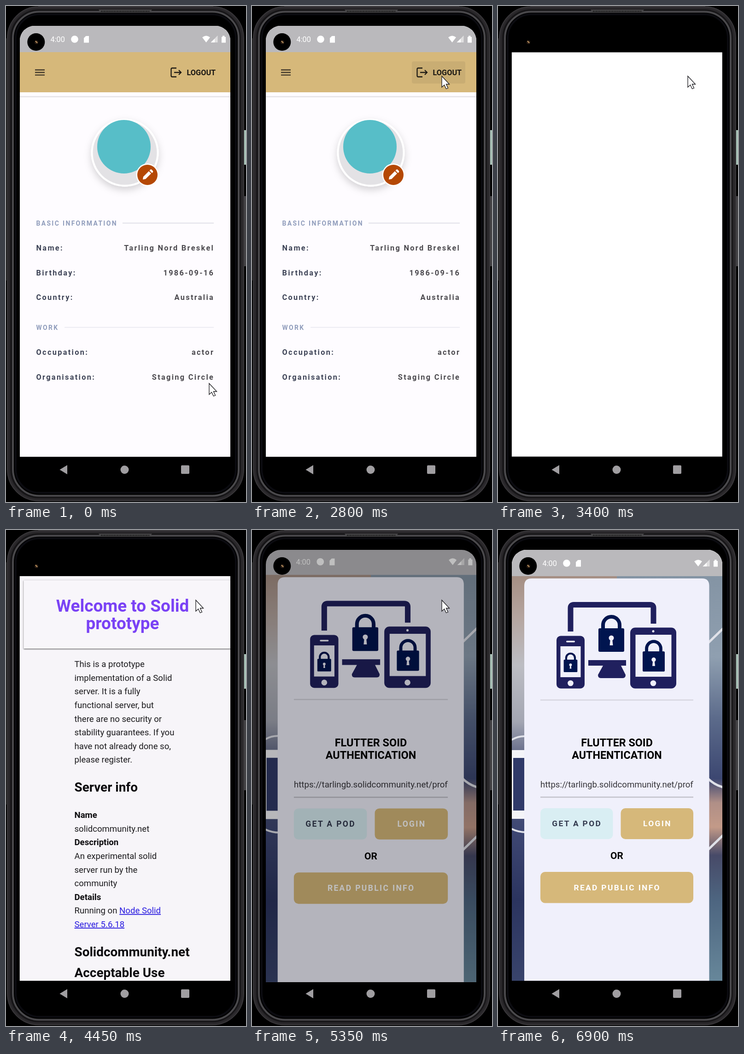
Recreate the animation shown at these times as an HTML page. Size 521x1075 px, loop 7000 ms.

```html
<!DOCTYPE html>
<html lang="en">
<head>
<meta charset="utf-8">
<title>Phone login demo</title>
<style>
html, body { margin: 0; height: 100%; overflow: hidden; background: #000; }
svg { display: block; font-family: Roboto, sans-serif; }
.row { font-weight: 700; font-size: 16.3px; letter-spacing: 2.33px; }
.head { font-weight: 700; font-size: 13.96px; letter-spacing: 2.33px; fill: #8f9cbb; }
.btn { font-weight: 700; font-size: 17.4px; letter-spacing: 2.33px; fill: #fff; }
.mid { text-anchor: middle; }
.end { text-anchor: end; }
.title { font-weight: 700; font-size: 23.3px; }
.web { font-size: 18.6px; fill: #1c1b1e; }
.web .b { font-weight: 700; fill: #0c0b0e; }
.web .h2 { font-weight: 700; font-size: 27.9px; fill: #0c0b0e; }
.web .link { fill: #2b1de0; text-decoration: underline; }
</style>
</head>
<body>
<svg width="521" height="1075" viewBox="0 0 521 1075">
  <defs>
    <clipPath id="screen"><rect x="30" y="43" width="457" height="990" rx="32"/></clipPath>
    <clipPath id="window"><rect x="30" y="43" width="457" height="934"/></clipPath>
    <clipPath id="page"><rect x="29.5" y="100" width="457.5" height="877"/></clipPath>
    <clipPath id="field"><rect x="92" y="530" width="332" height="45"/></clipPath>
    <linearGradient id="left" x2="0" y2="1">
      <stop offset="0" stop-color="#a58f84"/><stop offset=".1" stop-color="#b5a59f"/>
      <stop offset=".22" stop-color="#bcbdc3"/><stop offset=".36" stop-color="#a3a6b2"/>
      <stop offset=".45" stop-color="#5d6484"/><stop offset=".62" stop-color="#3f4874"/>
      <stop offset=".8" stop-color="#2b345f"/><stop offset="1" stop-color="#39446c"/>
    </linearGradient>
    <linearGradient id="right" x2="0" y2="1">
      <stop offset="0" stop-color="#8494a4"/><stop offset=".2" stop-color="#8f9fb0"/>
      <stop offset=".35" stop-color="#5c6b8b"/><stop offset=".5" stop-color="#3c4771"/>
      <stop offset=".56" stop-color="#b08f87"/><stop offset=".62" stop-color="#c39a88"/>
      <stop offset=".69" stop-color="#474a68"/><stop offset=".8" stop-color="#4d6580"/>
      <stop offset="1" stop-color="#67879a"/>
    </linearGradient>
    <filter id="soft" x="-30%" y="-30%" width="160%" height="170%">
      <feDropShadow dx="0" dy="7" stdDeviation="8" flood-opacity=".17"/>
    </filter>
    <filter id="edge"><feDropShadow dx="0" dy="1" stdDeviation="1.8" flood-opacity=".75"/></filter>
    <g id="lock">
      <path d="M-18 3V-7a18 18 0 0 1 36 0V3" fill="none" stroke="#00154f" stroke-width="8"/>
      <rect x="-28" width="56" height="51" rx="3" fill="#00154f"/>
      <path d="M-2 22h4l1.5 15h-7z" fill="#f0f0fb"/><circle cy="21" r="5.5" fill="#f0f0fb"/>
    </g>
  </defs>

  <!-- phone body -->
  <path d="M70 .5H450M.5 70V595" stroke="#444" fill="none"/>
  <rect x="517" y="269" width="4" height="75" fill="#a9c3b8"/>
  <rect x="517" y="412" width="4" height="152" fill="#434245"/>
  <rect x="3" y="1.5" width="513" height="1071" rx="68" fill="#2b292c" stroke="#39373a" stroke-width="2"/>
  <rect x="9" y="7" width="501" height="1060" rx="62" fill="#141315" stroke="#222023" stroke-width="2"/>
  <rect x="15" y="12.5" width="490" height="1049" rx="57" fill="#000" stroke="#4a494c" stroke-width="4"/>
  <rect x="21" y="18" width="478" height="1037" rx="51" fill="#000" stroke="#0b0b10" stroke-width="4"/>
  <path d="M201 8H317L312 14H206Z" fill="#4a494b"/>
  <path d="M206 11.5H312" stroke="#161616" stroke-width="3" stroke-dasharray="2 1.5"/>

  <g clip-path="url(#screen)">
    <g id="app">
      <g clip-path="url(#window)">
        <g id="profile">
          <rect x="30" y="43" width="457" height="934" fill="#fefcff"/>
          <rect x="30" y="100" width="457" height="87" fill="#d6b87a"/>
          <path d="M30 196.5H487" stroke="#e9e7ea" stroke-width="3"/>
          <rect id="hover" x="347" y="120" width="116" height="48" rx="4"/>
          <path d="M63 138.500H84M63 144H84M63 149.700H84" stroke="#41382a" stroke-width="2.3"/>
          <path d="M370 134.500H361Q358.500 134.500 358.500 137V151Q358.500 153.500 361 153.500H370M365 144H380M375 139L380 144L375 149"
            fill="none" stroke="#1f1b15" stroke-width="2.3"/>
          <text x="392.5" y="149.600" font-size="16.3" font-weight="700" fill="#1a1713">LOGOUT</text>
          <circle cx="258" cy="318" r="73.5" fill="#fff" filter="url(#soft)"/>
          <circle cx="258" cy="318" r="69.5" fill="#e3e2e5"/>
          <ellipse cx="256" cy="305" rx="58" ry="58" fill="#57bec8"/>
          <circle cx="307" cy="366" r="24.5" fill="#fff"/>
          <circle cx="307" cy="366" r="22" fill="#b54804"/>
          <path d="M297 376l1-6 12-12 5 5-12 12zM311.5 356.500l2-2q1.500-1 3 .5l2 2q1.500 1.500 .5 3l-2 2z" fill="#fff"/>
          <path d="M253 470.500H451" stroke="#d6d7e0" stroke-width="1.5"/>
          <path d="M127 696.500H451" stroke="#e6e6ee" stroke-width="1.5"/>
          <text class="head" x="65.5" y="475.8">BASIC INFORMATION</text>
          <text class="head" x="65.5" y="701.5">WORK</text>
          <g id="rows"></g>
        </g>

        <g id="login">
          <rect x="30" y="40" width="457" height="937" fill="#fff"/>
          <rect x="30" y="100" width="228" height="877" fill="url(#left)"/>
          <rect x="258" y="100" width="229" height="877" fill="url(#right)"/>
          <rect x="20" y="477" width="50" height="149" rx="6" fill="#f4f4f8"/>
          <rect x="33" y="494" width="40" height="114" fill="#303a69"/>
          <g fill="none" stroke="#dfe1e8" stroke-width="5">
            <path d="M26 457Q42 446 60 447M26 646Q42 655 60 655" stroke-width="4"/>
            <path d="M455 246L490 212M455 538Q470 553 490 558M455 694L490 660"/>
          </g>
          <path d="M57 977V121Q57 105 73 105H443Q458.500 105 458.500 121V977Z" fill="#f0f0fb"/>
          <g fill="#20205e">
            <path d="M157.500 220V169Q157.500 162 164.500 162H330.500Q337.500 162 337.500 169V203" fill="none" stroke="#20205e" stroke-width="12"/>
            <path d="M196 282H278V294H267L277 314Q277 321 271 321H223Q217 321 217 314L228 294H196Z"/>
            <rect x="127" y="229.5" width="61" height="114" rx="9"/>
            <rect x="287" y="211.5" width="100" height="132" rx="11"/>
          </g>
          <g fill="#f0f0fb">
            <rect x="135.5" y="252" width="44" height="67"/>
            <rect x="298.5" y="227" width="78" height="91"/>
            <rect x="148" y="240" width="19" height="3.5" rx="1.7"/>
            <circle cx="157.5" cy="332" r="6.3"/><circle cx="337" cy="332" r="6.3"/><circle cx="337" cy="219.5" r="2.5"/>
          </g>
          <use href="#lock" x="246" y="213"/>
          <use href="#lock" transform="translate(157.5 281) scale(.53)"/>
          <use href="#lock" transform="translate(338 263) scale(.857)"/>
          <path d="M92 368.500H424" stroke="#d2d1da" stroke-width="2"/>
          <g class="mid title">
            <text x="258" y="469">FLUTTER SOID</text><text x="258" y="496">AUTHENTICATION</text>
            <text x="258" y="713" style="font-size:20.9px">OR</text>
          </g>
          <text x="92" y="558" font-size="18.6" fill="#37363b" clip-path="url(#field)">https://tarlingb.solidcommunity.net/profile</text>
          <path d="M92 579H424" stroke="#c3c2cb" stroke-width="2.5"/>
          <rect x="92" y="603" width="157.5" height="67" rx="10" fill="#d9eef3"/>
          <rect x="266.5" y="603" width="157.5" height="67" rx="10" fill="#d6b87a"/>
          <rect x="92" y="741" width="332" height="67.5" rx="10" fill="#d6b87a"/>
          <g class="mid btn">
            <text x="171.2" y="642.3" style="fill:#343b50">GET A POD</text>
            <text x="345.9" y="642.3">LOGIN</text><text x="258.7" y="780.8">READ PUBLIC INFO</text>
          </g>
        </g>
      </g>

      <rect x="30" y="43" width="457" height="57" fill="#bab9bc"/>
      <g fill="#fff">
        <text x="96.5" y="78" font-size="16.3">4:00</text>
        <circle cx="149" cy="72" r="7.8"/>
        <path d="M173.500 65H180V79.500H169V69.500Z"/>
        <path d="M426 68Q434.500 61 443 68L434.500 79Z"/>
        <path d="M459.500 64V79H444.500Z" opacity=".55"/><path d="M453 71V79H444.500Z"/>
        <path d="M468 67H470V64.500H474.500V67H477V79.500H468Z"/>
      </g>
    </g>
  </g>
  <g id="web" clip-path="url(#page)">
    <rect x="29.5" y="100" width="457.5" height="877" fill="#fff"/>
    <g id="content">
      <rect x="31" y="101" width="456" height="876" fill="#f7f5f9"/>
      <rect x="38.5" y="109" width="470" height="148" fill="#f8f6fa" filter="url(#edge)"/>
      <g class="mid" font-size="36.9" font-weight="700" fill="#7a42f5">
        <text x="253" y="177">Welcome to Solid</text><text x="253" y="214.5">prototype</text>
      </g>
      <g class="web" id="copy"></g>
    </g>
  </g>

  <circle cx="65.3" cy="78" r="19"/>
  <circle cx="66" cy="78.5" r="4" fill="#2b1d14"/><path d="M64 76l4 4" stroke="#c39a63" stroke-width="2"/>
  <g fill="#a09ea1">
    <path d="M116.500 1005L133 995V1015Z"/><circle cx="257.5" cy="1005" r="9"/>
    <rect x="380" y="995.5" width="18" height="18.5" rx="2"/>
  </g>
  <path id="cursor" d="M0 0V24L5.500 19L9.500 27.500L13.500 26L9.500 17.500H16.500Z" fill="#fff" stroke="#1b1a1e" stroke-width="1.3"/>
</svg>
<script>
const $ = id => document.getElementById(id);
const text = (x, y, s, cls, fill = '') =>
  `<text x="${x}" y="${y}" class="${cls}" ${fill && `fill="${fill}"`}>${s}</text>`;

$('rows').innerHTML = [
  [530, 'Name:', 'Tarling Nord Breskel'], [584, 'Birthday:', '1986-09-16'],
  [637.4, 'Country:', 'Australia'], [756, 'Occupation:', 'actor'],
  [809.5, 'Organisation:', 'Staging Circle']
].map(([y, a, b]) => text(65.5, y, a, 'row', '#3d4356') + text(452.2, y, b, 'row end', '#4b494e')).join('');

const block = (y, lines) => lines.map((s, i) => {
  const bold = s[0] === '*';
  return text(148.5, y + i * 29.57, bold ? s.slice(1) : s, bold ? 'b' : '');
}).join('');
$('copy').innerHTML =
  block(297.3, ['This is a prototype', 'implementation of a Solid', 'server. It is a fully',
    'functional server, but', 'there are no security or', 'stability guarantees. If you',
    'have not already done so,', 'please register.']) +
  text(148.5, 567, 'Server info', 'h2') +
  block(624.3, ['*Name', 'solidcommunity.net', '*Description', 'An experimental solid',
    'server run by the', 'community', '*Details',
    'Running on <tspan class="link">Node Solid</tspan>',
    '<tspan class="link">Server 5.6.18</tspan>']) +
  text(148.5, 924, 'Solidcommunity.net', 'h2') + text(148.5, 968.5, 'Acceptable Use', 'h2');

// cursor stops: time, x, y
const path = [[0, 441, 818], [100, 441, 818], [850, 400, 391], [1550, 373, 297], [1650, 375, 255],
  [2350, 412, 152], [6650, 412, 152], [6750, 455, 125], [6850, 525, 130], [7000, 525, 130]];

const clamp = v => Math.max(0, Math.min(1, v));
const ramp = (t, a, b) => clamp((t - a) / (b - a));
const zoom = (el, s) =>
  el.setAttribute('transform', `translate(258 539) scale(${s}) translate(-258 -539)`);
const fade = (el, a) => el.setAttribute('opacity', a);

function draw(t) {
  const i = path.findIndex(p => p[0] > t), [t0, x0, y0] = path[i - 1], [t1, x1, y1] = path[i];
  const k = (t - t0) / (t1 - t0);
  $('cursor').setAttribute('transform', `translate(${x0 + (x1 - x0) * k} ${y0 + (y1 - y0) * k})`);

  // login page slides up while fading in
  fade($('hover'), t >= 2250 ? .06 : 0);
  const p = ramp(t, 2900, 3230);
  fade($('login'), p * p);
  $('login').setAttribute('transform', `translate(0 ${207 * (1 - p) ** 2})`);

  // the app grows and gives way to the browser, then comes back
  const out = ramp(t, 3150, 3300), open = t < 5150;
  zoom($('app'), open ? 1 + .0076 * ramp(t, 3100, 3150) + .055 * out : 1 + .011 * (1 - ramp(t, 5250, 5500)));
  fade($('app'), open ? 1 - out : ramp(t, 5200, 5400));

  fade($('web'), open ? out : 0);
  zoom($('web'), 1 - .1 * (1 - ramp(t, 3150, 3450)) ** 3);
  fade($('content'), ramp(t, 4250, 4400));
}

const start = performance.now();
function tick(now) {
  const t = Math.max(0, now - start) % 7000;
  draw(Math.floor(t / 50) * 50);
  requestAnimationFrame(tick);
}
draw(0);
requestAnimationFrame(tick);
</script>
</body>
</html>
```
